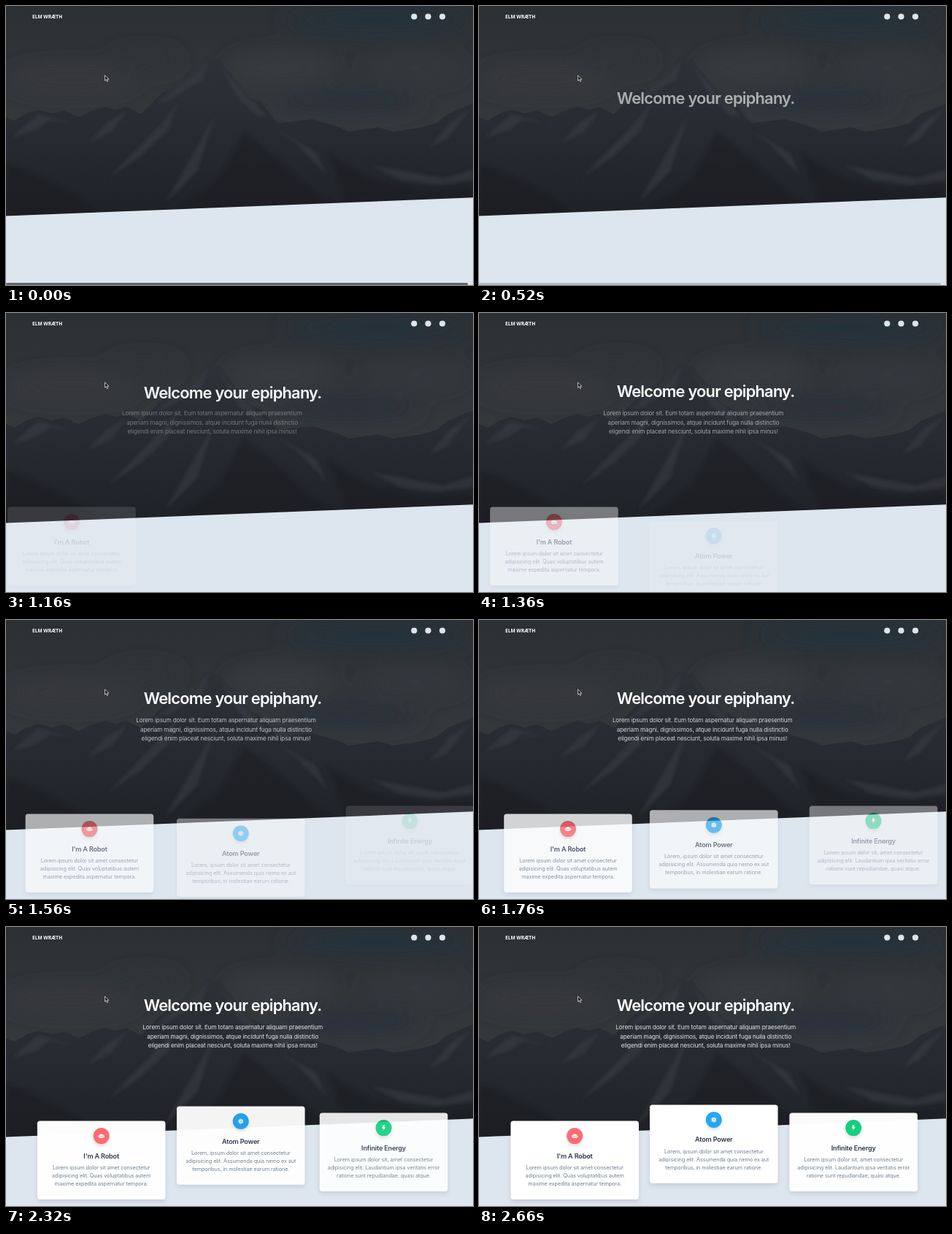
An HTML page for the animation above (2.7 s loop, 640x382 px).

```html
<!DOCTYPE html>
<html lang="en">
<head>
<meta charset="utf-8">
<title>Landing page reveal</title>
<style>
  html, body { margin: 0; width: 100%; height: 100%; overflow: hidden; background: #dde5ee; }
  svg { display: block; width: 640px; height: 382px; }
  text { font-family: Inter, "Liberation Sans", sans-serif; font-optical-sizing: none; text-anchor: middle; }
  .brand { font: 700 6.6px "Open Sans", sans-serif; text-anchor: start; fill: #fff; }
  .title { font-size: 21.9px; font-weight: 600; letter-spacing: -.037em; fill: #fff; }
  .intro { font-size: 8.23px; letter-spacing: -.021em; fill: #dfe4ea; }
  .name { font-size: 9.14px; font-weight: 600; letter-spacing: -.022em; fill: #2d3748; }
  .copy { font-size: 7.31px; letter-spacing: -.012em; fill: #718096; }
  .panel { fill: #fff; filter: drop-shadow(0 3px 3px rgba(0, 0, 0, .11)); }
  .badge { filter: drop-shadow(0 3px 2px rgba(0, 0, 0, .12)); }
</style>
</head>
<body>
<svg viewBox="0 0 640 382">
  <defs>
    <linearGradient id="sky" x2="0" y2="1">
      <stop stop-color="#2c3033"/><stop offset=".3" stop-color="#313538"/><stop offset=".6" stop-color="#35393c"/>
    </linearGradient>
    <linearGradient id="rock" gradientUnits="userSpaceOnUse" x1="0" y1="70" x2="0" y2="290">
      <stop stop-color="#2e3237"/><stop offset=".5" stop-color="#272b31"/><stop offset="1" stop-color="#1e2126"/>
    </linearGradient>
    <filter id="soft" x="-50%" y="-100%" width="200%" height="300%"><feGaussianBlur stdDeviation="14"/></filter>
    <filter id="haze"><feGaussianBlur stdDeviation="2.2"/></filter>
  </defs>

  <rect width="640" height="300" fill="url(#sky)"/>
  <g filter="url(#soft)">
    <ellipse cx="510" cy="20" rx="130" ry="22" fill="#28303a"/>
    <ellipse cx="470" cy="130" rx="100" ry="18" fill="#2a323b"/>
    <ellipse cx="190" cy="75" rx="50" ry="14" fill="#2d3439"/>
    <ellipse cx="90" cy="100" rx="90" ry="18" fill="#37393b"/>
    <ellipse cx="375" cy="85" rx="75" ry="22" fill="#383b3d"/>
    <ellipse cx="560" cy="85" rx="70" ry="16" fill="#34383c"/>
  </g>

  <g fill="url(#rock)">
    <path d="M0 152 12 157 30 146 45 142 62 147 80 143 100 152 118 143 135 138 150 142 165 138 185 148V300H0Z"/>
    <path d="M360 162 400 157 420 155 455 165 470 172 510 166 530 172 570 166 590 160 605 148 640 133V300H360Z"/>
    <path d="M120 225 185 148 200 133 215 118 232 111 250 100 262 90 270 75 277 70 285 74 292 72 300 84 320 108 335 125 350 133 370 158 400 178 450 200 500 236 560 262V300H90Z"/>
  </g>
  <g filter="url(#haze)" fill="#3c4147" opacity=".5">
    <path d="M277 72 262 92 232 113 205 134 222 130 250 112 270 100Z"/>
    <path d="M290 76 302 92 330 122 358 150 344 150 318 126Z"/>
    <path d="M236 132 214 160 180 195 140 236 185 205 222 170Z"/>
    <path d="M286 150 258 200 218 270 262 226Z"/>
    <path d="M372 170 400 190 440 232 425 200Z"/>
    <path d="M45 148 30 160 8 180 40 170 60 156 92 162Z"/>
    <path d="M165 144 138 160 112 188 145 172Z"/>
    <path d="M500 218 545 226 600 236 640 224V238L590 245 540 238Z"/>
    <path d="M636 142 608 160 580 194 604 182Z"/>
  </g>
  <g filter="url(#haze)" fill="#1a1d21" opacity=".55">
    <path d="M0 216 24 222 60 240 100 262 130 290H0Z"/>
    <path d="M326 172 350 190 385 220 430 262 470 280H235L290 238Z"/>
    <path d="M440 200 500 236 570 252 640 248V275H470Z"/>
  </g>
  <path fill="#dde5ee" d="M0 287.5 640 262.3V382H0Z"/>

  <text class="brand" x="36" y="17.1">ELM WRÆTH</text>
  <g fill="#dfe4ea">
    <circle cx="559.3" cy="14.5" r="4.1"/><circle cx="578.5" cy="14.5" r="4.1"/><circle cx="598" cy="14.5" r="4.1"/>
  </g>

  <g id="content"></g>
  <rect id="scrollbar" x="0" y="379" width="633" height="3" rx="1.5"/>
  <path d="M135.6 95v7.2l1.7-1.5 1.2 2.7 1.3-.6-1.2-2.6h2.2Z" fill="#111" stroke="#fff" stroke-width=".7"/>
</svg>

<script>
const DURATION = 1560, DISTANCE = 47, LOOP = 2700;

const lines = (cls, y, step, rows) =>
  rows.map((row, i) => `<text class="${cls}" y="${y + i * step}">${row}</text>`).join('');

const card = (color, icon, name, rows) => `
  <rect class="panel" x="-87.8" width="175.6" height="107.3" rx="3.7"/>
  <circle class="badge" cy="20.5" r="11" fill="${color}"/>
  <g transform="translate(0 20.5)" fill="#fff">${icon}</g>
  <text class="name" y="51">${name}</text>` + lines('copy', 66.2, 11, rows);

const robot = `<rect x="-2.9" y="-2" width="5.8" height="5" rx="1"/>
  <path d="M-.4-3.4h.8v2h-.8zM-4.2-.5h.9v2.4h-.9zM3.3-.5h.9v2.4h-.9z"/>
  <path d="M-1.9-.4h1.2v1.1h-1.2zM.7-.4h1.2v1.1H.7zM-1.7 1.6h3.4v.6h-3.4z" fill="#fc6b72"/>`;
const atom = [30, 90, 150].map(a =>
  `<ellipse rx="3.4" ry="1.5" transform="rotate(${a})" fill="none" stroke="#fff" stroke-width=".8"/>`).join('') +
  '<circle r=".8"/>';
const bolt = '<path d="M-1.3-3.8h2.8L.8-1.3h1.8L-.7 4 0 .8h-2Z"/>';

// dx, dy: side from which the part slides in
const parts = [
  { x: 310.6, y: 115, dx: 0, dy: 1, delay: 0,
    html: '<text class="title">Welcome your epiphany.</text>' },
  { x: 310.7, y: 140.3, dx: -1, dy: 0, delay: 800, html: lines('intro', 0, 12.3, [
    'Lorem ipsum dolor sit. Eum totam aspernatur aliquam praesentium',
    'aperiam magni, dignissimos, atque incidunt fuga nulla distinctio',
    'eligendi enim placeat nesciunt, soluta maxime nihil ipsa minus!']) },
  { x: 131.2, y: 265.6, dx: -1, dy: 0, delay: 1000, html: card('#fc6b72', robot, "I'm A Robot", [
    'Lorem ipsum dolor sit amet consectetur',
    'adipisicing elit. Quas voluptatibus autem',
    'maxime expedita aspernatur tempora.']) },
  { x: 321.8, y: 243.4, dx: 0, dy: 1, delay: 1200, html: card('#26a7f0', atom, 'Atom Power', [
    'Lorem, ipsum dolor sit amet consectetur',
    'adipisicing elit. Assumenda quia nemo ex aut',
    'temporibus, in molestiae earum ratione.']) },
  { x: 512.3, y: 254.6, dx: 1, dy: 0, delay: 1400, html: card('#12d07c', bolt, 'Infinite Energy', [
    'Lorem ipsum dolor sit, amet consectetur',
    'adipisicing elit. Laudantium ipsa veritatis error',
    'ratione sunt repudiandae, quasi atque.']) },
];

const content = document.getElementById('content');
const scrollbar = document.getElementById('scrollbar');
content.innerHTML = parts.map(p => `<g>${p.html}</g>`).join('');
parts.forEach((p, i) => p.node = content.children[i]);

const clamp = v => Math.min(1, Math.max(0, v));

// cubic-bezier(.25, .1, .25, 1), solved by bisection
function ease(x) {
  if (x <= 0 || x >= 1) return clamp(x);
  let lo = 0, hi = 1, u;
  for (let i = 0; i < 24; i++) {
    u = (lo + hi) / 2;
    if (.75 * u * (1 - u) + u ** 3 < x) lo = u; else hi = u;
  }
  return .3 * u * (1 - u) ** 2 + 3 * u * u * (1 - u) + u ** 3;
}

function draw(t) {
  for (const { x, y, dx, dy, delay, node } of parts) {
    const shown = t < 120 ? 0 : ease((t + 22 - delay) / DURATION);
    const away = DISTANCE * (1 - shown);
    node.setAttribute('transform', `translate(${x + dx * away} ${y + dy * away})`);
    node.setAttribute('opacity', shown);
  }
  scrollbar.setAttribute('opacity', .55 * clamp((640 - t) / 350));
}

const start = performance.now();
function tick() {
  draw((performance.now() - start) % LOOP);
  requestAnimationFrame(tick);
}
tick();
</script>
</body>
</html>
```
